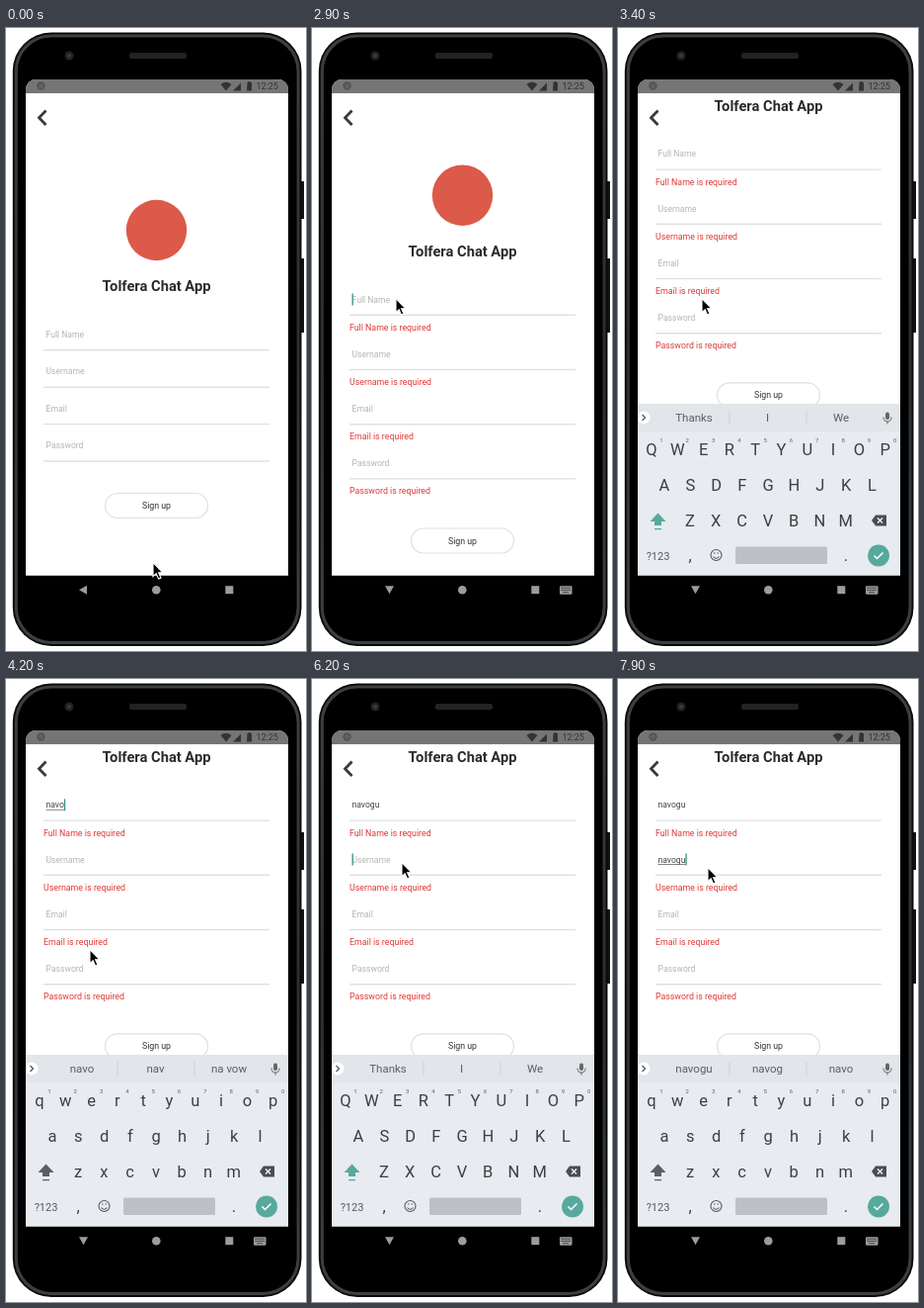
An HTML page that plays this animation: 304x630 px, repeating every 8000 ms.

```html
<!DOCTYPE html>
<html lang="en">
<head>
<meta charset="utf-8">
<title>Chat sign up</title>
<style>
  html, body { margin: 0; width: 100%; height: 100%; overflow: hidden; background: #fff; }
  svg { display: block; width: 304px; height: 630px; font-family: Roboto, sans-serif; }
  .mid { text-anchor: middle; }
  .title { font-size: 14.7px; font-weight: 700; fill: #2b2b2b; }
  .field { font-size: 8.6px; }
  .error { font-size: 8.8px; fill: #df3838; }
  .rule { stroke: #e1e1e1; stroke-width: 1.4; }
  .button { font-size: 8.8px; fill: #333; }
  .key { font-size: 16.5px; fill: #3c4043; }
  .hint { font-size: 6px; fill: #5f6368; }
  .word { font-size: 11.5px; fill: #5a5f64; }
  .nav { fill: #9c9c9c; }
</style>
</head>
<body>
<svg viewBox="0 0 304 630">
  <defs>
    <clipPath id="screen"><rect x="20" y="52" width="266" height="532" rx="10"/></clipPath>
    <clipPath id="window"><rect id="windowClip" x="20" y="66" width="266" height="487.500"/></clipPath>
    <linearGradient id="edge" x2="0" y2="1">
      <stop stop-color="#3c4042"/><stop offset=".5" stop-color="#2a2e30"/><stop offset="1" stop-color="#3c4042"/>
    </linearGradient>
  </defs>

  <g id="phone">
    <path d="M298 155h4v38h-4zM298 233h4v75h-4z" fill="#111"/>
    <rect x="6.800" y="4.500" width="292.700" height="620.500" rx="39" fill="#0a0a0a"/>
    <rect x="10.300" y="8" width="285.700" height="613.500" rx="35.500" fill="none" stroke="url(#edge)" stroke-width="3"/>
    <circle cx="64" cy="28" r="4.500" fill="#202224"/><circle cx="64" cy="28" r="2" fill="#3a3d42"/>
    <rect x="12" y="9.700" width="282.300" height="610" rx="34" fill="#000"/>
    <circle cx="64" cy="28" r="4.500" fill="#202224"/><circle cx="64" cy="28" r="2" fill="#3a3d42"/>
    <rect x="125" y="25" width="58" height="6" rx="2" fill="#222"/>
  </g>

  <g clip-path="url(#screen)">
    <rect x="20" y="52" width="266" height="501.500" fill="#fafafa"/>
    <g clip-path="url(#window)">
      <rect x="20" y="66" width="266" height="488" fill="#fff"/>
      <g id="content">
        <g id="brand">
          <circle cx="152.5" cy="204.5" r="30.7" fill="#dc5a49"/>
          <text class="title mid" x="152.5" y="266">Tolfera Chat App</text>
        </g>
        <g id="fields"></g>
        <g id="signUp">
          <rect x="100.5" y="-12.5" width="104" height="25" rx="12.5" fill="#fff" stroke="#e0e0e0" stroke-width="1.2"/>
          <text class="button mid" x="152.5" y="3">Sign up</text>
        </g>
      </g>
      <path d="M40.500 83.500l-7 7.200 7 7.200" fill="none" stroke="#3a3a3a" stroke-width="2.800"/>
    </g>

    <g id="status">
      <rect x="20" y="52" width="266" height="14" fill="#757575"/>
      <circle cx="35.500" cy="58.500" r="4.200" fill="#555"/><circle cx="35.500" cy="58.500" r="2.200" fill="#626262"/>
      <g fill="#333">
        <path d="M217.500 57q5.500-4.500 11 0L223 63.500zM230 63.500l8-8v8zM244.500 55h1v-1h2v1h1.500v8.500h-5z"/>
        <text x="253.500" y="62" font-size="9">12:25</text>
      </g>
    </g>

    <g id="keyboard">
      <rect x="20" y="380" width="266" height="173.500" fill="#e8ebef"/>
      <rect x="20" y="380" width="266" height="28" fill="#e2e5e9"/>
      <path d="M113 387v14M191 387v14" stroke="#cdd1d5"/>
      <circle cx="26" cy="394" r="6.500" fill="#fff"/>
      <path d="M24.500 391l3 3-3 3" fill="none" stroke="#555" stroke-width="1.200"/>
      <rect x="271" y="388.500" width="4" height="7.500" rx="2" fill="#666"/>
      <path d="M269 393.500q0 4.500 4 4.500t4-4.500M273 398v2.500" fill="none" stroke="#666"/>
      <g id="words"></g>
      <g id="keys"></g>
      <path id="shift" d="M40.500 490.500l8 8.500h-4.500v4h-7v-4h-4.500zM37 506h7v1.200h-7z"/>
      <path d="M257 498l4-5.500h11v11h-11z" fill="#4a4e52"/>
      <path d="M263 495.500l5 5m0-5l-5 5" stroke="#fff" stroke-width="1.200"/>
      <text class="mid" x="40.500" y="537.500" font-size="11" fill="#55595d">?123</text>
      <text class="key mid" x="73" y="539">,</text>
      <text class="key mid" x="231" y="539">.</text>
      <g fill="none" stroke="#55595d" stroke-width="1.100">
        <circle cx="99.500" cy="533" r="5.500"/><path d="M96.500 534.500q3 3.500 6 0M97 531h1.500M100.500 531h1.500"/>
      </g>
      <rect x="119" y="524.500" width="93" height="17.500" rx="1.500" fill="#bdc1c5"/>
      <circle cx="264" cy="533.500" r="11" fill="#57a99d"/>
      <path d="M259.500 533.500l3 3 6-6" fill="none" stroke="#fff" stroke-width="1.500"/>
    </g>

    <g class="nav">
      <path id="back"/>
      <circle cx="152.300" cy="568.200" r="4.300"/>
      <rect x="222.300" y="564.200" width="8" height="8"/>
      <g id="switcher">
        <rect x="251" y="564.200" width="12.500" height="8.500" rx="1"/>
        <path d="M252.500 566.200h9.500M252.500 568.400h9.500M254.500 570.700h5.500" stroke="#111" stroke-dasharray="1.200 .8"/>
      </g>
    </g>
  </g>
  <path id="pointer" d="M0-.5V13.700l3.200-3 2.400 5.400 2.400-1-2.400-5.300H10z" fill="#000" stroke="#fff" stroke-width="1.100"/>
</svg>

<script>
const LOOP = 8000, STEP = 100;
const NAME = 'navogu';
const PRESS = 1100, FOCUS = 2700, RESIZE = 3000, NEXT = 5900;
const TYPED = [
  [3700, 3900, 4000, 4200, 4500, 4800],
  [6600, 6900, 7100, 7300, 7500, 7800]
];
const GUESSES = {
  '': ['Thanks', 'I', 'We'],
  n: ['n', 'no', 'new'],
  na: ['na', 'nap', 'name'],
  nav: ['nav', 'na', 'navy'],
  navo: ['navo', 'nav', 'na vow']
};
const $ = id => document.getElementById(id);

function add(parent, tag, attrs, text = '') {
  const node = document.createElementNS('http://www.w3.org/2000/svg', tag);
  for (const key in attrs) node.setAttribute(key, attrs[key]);
  node.textContent = text;
  return parent.appendChild(node);
}
const show = (node, on) => node.setAttribute('visibility', on ? 'visible' : 'hidden');
const shift = (node, x, y) => node.setAttribute('transform', `translate(${x} ${y})`);

// Eased interpolation through [time, value] stops.
function along(t, stops) {
  let [t0, v0] = stops[0];
  for (const [t1, v1] of stops) {
    if (t < t1) {
      const p = Math.max(0, (t - t0) / (t1 - t0));
      return v0 + (v1 - v0) * p * p * (3 - 2 * p);
    }
    [t0, v0] = [t1, v1];
  }
  return v0;
}

const fields = ['Full Name', 'Username', 'Email', 'Password'].map(label => {
  const group = add($('fields'), 'g', {});
  return {
    label, group,
    text: add(group, 'text', { class: 'field', x: 40.5, y: 3 }),
    rule: add(group, 'path', { class: 'rule', d: 'M38 15.8H267' }),
    error: add(group, 'text', { class: 'error', x: 38, y: 31.4 }, label + ' is required'),
    underline: add(group, 'path', { stroke: '#666', 'stroke-width': .8 }),
    caret: add(group, 'rect', { y: -6, width: 1.3, height: 12, fill: '#2f9688' })
  };
});

const keys = [['qwertyuiop', 34, 426], ['asdfghjkl', 47, 462], ['zxcvbnm', 73, 498]]
  .flatMap(([row, x, y], r) => [...row].map((letter, i) => {
    const cx = x + i * 26.3;
    if (!r) add($('keys'), 'text', { class: 'hint mid', x: cx + 10, y: y - 7.5 }, (i + 1) % 10);
    return { letter, node: add($('keys'), 'text', { class: 'key mid', x: cx, y: y + 5.8 }) };
  }));
const words = [77, 151.5, 226].map(x => add($('words'), 'text', { class: 'word mid', x, y: 398 }));

function drawFields(t, failed, active) {
  fields.forEach((f, i) => {
    shift(f.group, 0, failed ? 274.5 + i * 55.2 : 310 + i * 37.4);
    show(f.error, failed);
    const times = TYPED[i] || [];
    const count = times.filter(s => s <= t).length;
    f.text.textContent = NAME.slice(0, count) || f.label;
    f.text.setAttribute('fill', count ? '#444' : '#b5b5b5');

    const focused = i === active;
    const end = 40.5 + (count ? f.text.getComputedTextLength() : 0);
    const since = count ? times[count - 1] : [FOCUS, NEXT][i];
    show(f.caret, focused && (t - since) % 1000 < 500);
    f.caret.setAttribute('x', end);
    show(f.underline, focused && count > 0);
    f.underline.setAttribute('d', `M40.5 5H${end}`);
  });
}

function drawKeyboard(t, active) {
  show($('keyboard'), t >= RESIZE);
  shift($('keyboard'), 0, along(t, [[3000, 64], [3200, 0]]));
  $('keyboard').setAttribute('opacity', along(t, [[3000, .1], [3100, .5], [3200, 1]]));

  const count = active < 0 ? 0 : TYPED[active].filter(s => s <= t).length;
  const typed = NAME.slice(0, count);
  const guesses = GUESSES[typed] || [typed, typed.slice(0, -1), typed.slice(0, -2)];
  words.forEach((node, i) => node.textContent = guesses[i]);
  for (const { letter, node } of keys) node.textContent = count ? letter : letter.toUpperCase();
  $('shift').setAttribute('fill', count ? '#5a5f64' : '#57a99d');
}

function render(t) {
  const failed = t >= PRESS, resized = t >= RESIZE;
  const active = t < FOCUS ? -1 : t < NEXT ? 0 : 1;

  shift($('content'), 0, resized ? -147.2 : 0);
  $('windowClip').setAttribute('height', resized ? 314 : 487.5);
  shift($('brand'), 0, failed ? -35.3 : 0);
  shift($('signUp'), 0, failed ? 518.5 : 483);
  $('signUp').setAttribute('opacity', along(t, [[800, 1], [1000, .22], [1200, .22], [1500, 1]]));

  drawFields(t, failed, active);
  drawKeyboard(t, active);

  const open = t >= 2800;
  $('back').setAttribute('d', open ? 'M74 564.2h9l-4.5 8z' : 'M74 568.2l8-4.5v9z');
  show($('switcher'), open);

  shift($('pointer'),
    along(t, [[1400, 149], [2500, 85], [5200, 85], [5800, 91]]),
    along(t, [[0, 541], [500, 479], [1400, 479], [2500, 274], [5200, 274], [5800, 186], [6200, 186], [6500, 191]]));
}

const start = performance.now();
function tick() {
  const elapsed = performance.now() - start + 10;
  render(Math.floor(elapsed / STEP) * STEP % LOOP);
  requestAnimationFrame(tick);
}
tick();
</script>
</body>
</html>
```
